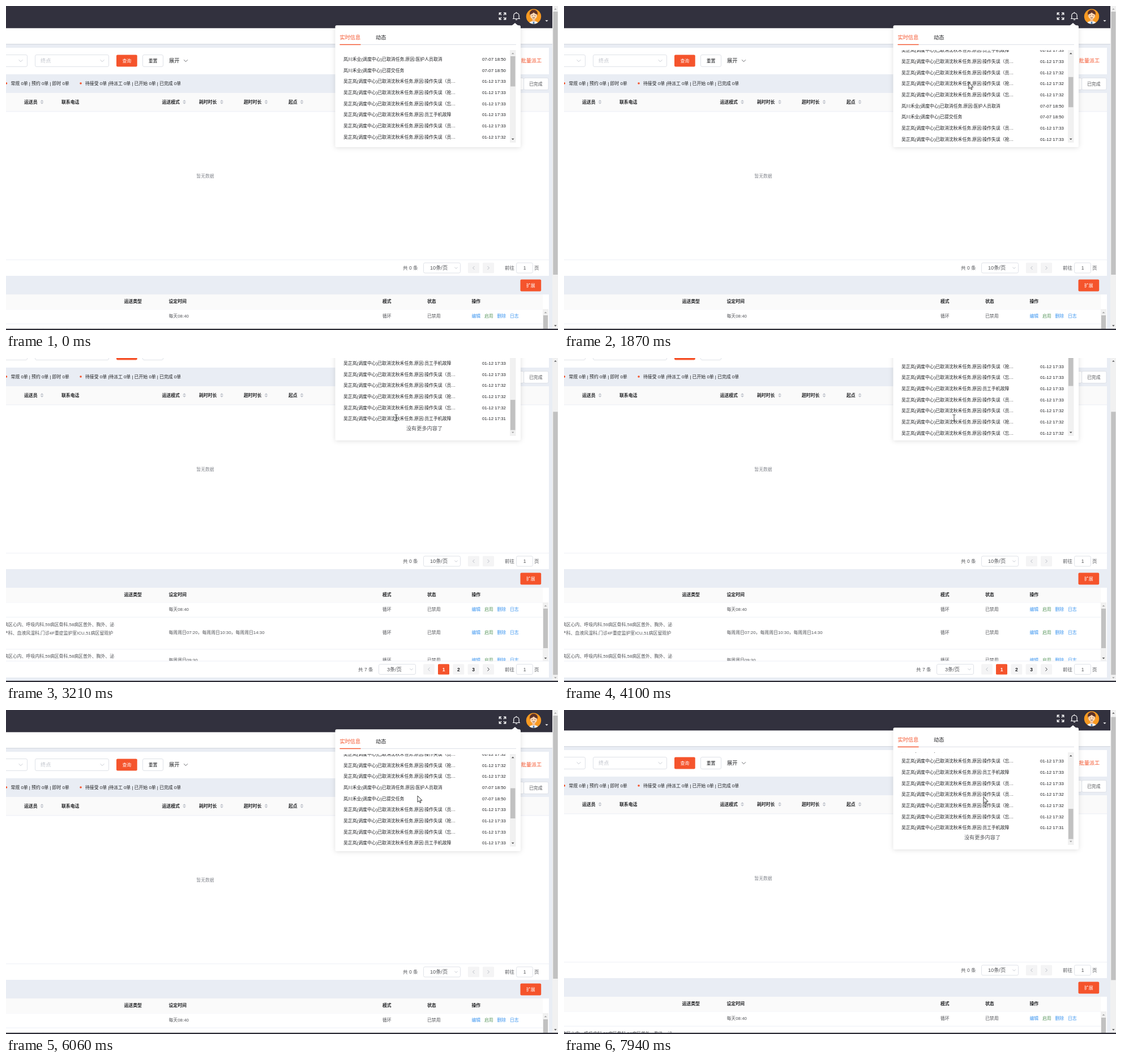
These frames come from a looping animation (975x574 px, 8000 ms). An HTML page:

```html
<!DOCTYPE html>
<html>
<head>
<meta charset="utf-8">
<title>Notification panel</title>
<style>
  html, body { margin: 0; width: 100%; height: 100%; overflow: hidden; background: #e9edf4; }
  svg { display: block; width: 975px; height: 574px; }
  text { font-family: "Liberation Sans", "Noto Sans CJK SC", "Noto Sans CJK", sans-serif; white-space: pre; }
</style>
</head>
<body>
<svg id="stage" viewBox="0 0 975 574"></svg>
<script>
const LOOP = 8000, ROW = 19.67;
const S = 7.87, M = 8.53, L = 9.19;
const ACCENT = '#f5542c', DARK = '#1f2023', GREY = '#525458', PALE = '#c0c4cc', LINE = '#ebeef5', BLUE = '#3b95f0';

// Markup helpers; y is the vertical centre of a text
const rect = (x, y, w, h, fill, extra = '') =>
  `<rect x="${x}" y="${y}" width="${w}" height="${h}" fill="${fill}" ${extra}/>`;
const path = (d, extra) => `<path d="${d}" ${extra}/>`;
const text = (x, y, str, { size = S, fill = GREY, anchor = 'start', weight = 400 } = {}) =>
  `<text x="${x}" y="${y + size * .37}" font-size="${size}" fill="${fill}" text-anchor="${anchor}" font-weight="${weight}">${str}</text>`;
const head = (x, y, str) => text(x, y, str, { fill: DARK, weight: 700 });
const box = (x, y, w, h) => rect(x + .5, y + .5, w - 1, h - 1, '#fff', 'rx="2.5" stroke="#dcdfe6" stroke-width=".9"');
const button = (x, y, str) => rect(x, y, 36.7, 21, ACCENT, 'rx="2"') +
  text(x + 18.3, y + 10.7, str, { fill: '#fff', anchor: 'middle', weight: 500 });
const chevron = (x, y, color = PALE, turn = 0, r = 3.4) =>
  path(`M${-r} ${-r / 2}L0 ${r / 2} ${r} ${-r / 2}`, `transform="translate(${x} ${y}) rotate(${turn})" fill="none" stroke="${color}" stroke-width=".9"`);
const triangle = (x, y, dir, r, fill, id = '') =>
  path(`M${x - r} ${y + dir * r / 2}h${2 * r}L${x} ${y - dir * r / 2}Z`, `fill="${fill}" ${id && `id="${id}"`}`);
const carets = (x, y) => triangle(x, y - 2.3, 1, 3, PALE) + triangle(x, y + 2.3, -1, 3, PALE);
const pageButton = (x, y, label, active) => rect(x, y - 9.3, 20, 18.6, active ? ACCENT : '#f4f4f5', 'rx="1.5"') +
  text(x + 10, y, label, { size: M, fill: active ? '#fff' : DARK, anchor: 'middle', weight: 700 });
const arrowButton = (x, y, turn, color) => pageButton(x, y, '') + chevron(x + 10, y, color, turn, 3);

function pager(y, total, totalX, selectX, perPage, labelX) {
  return text(totalX, y, `共 ${total} 条`, { size: M }) +
    box(selectX, y - 9.5, 66, 19) + text(labelX, y, perPage, { size: L }) + chevron(selectX + 58, y, PALE, 0, 2.6) +
    text(881, y, '前往', { size: M }) + box(901, y - 9.5, 30, 19) +
    text(916, y, '1', { size: M, anchor: 'middle' }) + text(933, y, '页', { size: M });
}

function topBar() {
  let s = rect(0, 39, 965, 28.5, '#fff') + rect(0, 0, 965, 39.3, '#32313e') + rect(0, 67, 965, 1.3, '#d6dae1');
  for (const turn of [0, 90, 180, 270])
    s += path('M2 -2L5.5 -5.5M2 -5.7H5.7V-2', `transform="translate(877 18) rotate(${turn})" fill="none" stroke="#fff" stroke-width="1.4"`);
  s += path('M895 22.5H908M896.7 22V17a4.7 4.7 0 0 1 9.4 0V22M901.4 12V10.7M900 24.3H903', 'fill="none" stroke="#fff" stroke-width="1.2"');
  s += '<clipPath id="face"><circle cx="932" cy="18.5" r="13.2"/></clipPath><g clip-path="url(#face)">' +
    rect(918, 5, 28, 28, '#f89a22') +
    '<ellipse cx="932" cy="32.5" rx="9" ry="6" fill="#eef3f8"/>' +
    rect(929.5, 21, 5, 6.5, '#eebb94') +
    '<ellipse cx="932" cy="13.2" rx="7" ry="6.8" fill="#5f3328"/>' +
    '<ellipse cx="932" cy="17.2" rx="5.9" ry="6.2" fill="#fbd7b5"/>' +
    path('M926 14.5Q927 9 932 9T938 14.5Q934 14 932 11.5 930 14 926 14.5Z', 'fill="#5f3328"') +
    path('M928.8 17h1.6M933.6 17h1.6M930 20.5q2 1.5 4 0', 'stroke="#5a3527" stroke-width=".9" fill="none"') +
    path('M931 28h2l.8 4h-3.6Z', 'fill="#4b7fb5"') + '</g>';
  return s + triangle(955, 26.5, -1, 2.6, '#fff');
}

function filters() {
  let s = rect(0, 74, 959, 47, '#fff') + box(-60, 86, 98, 22) + chevron(26, 97) +
    box(51, 86, 131, 22) + text(61, 97, '终点', { size: L, fill: PALE }) + chevron(170, 97) +
    button(195, 86.5, '查询') + box(241, 86, 37, 22) +
    text(259.5, 97, '重置', { fill: DARK, anchor: 'middle', weight: 500 }) +
    text(288, 97, '展开', { size: L, fill: DARK }) + chevron(317.5, 97, GREY) +
    text(909.5, 97, '批量派工', { size: L, fill: ACCENT });
  for (const x of [.5, 132]) s += `<circle cx="${x}" cy="137" r="1.8" fill="${ACCENT}"/>`;
  return s + text(8.5, 137, '常规 0单 | 预约 0单 | 即时 0单', { fill: DARK }) +
    text(140, 137, '待接受 0单 |待派工 0单 | 已开始 0单 | 已完成 0单', { fill: DARK }) +
    box(870, 127, 45, 22) + box(914, 127, 44.5, 22) + text(924, 138, '已完成');
}

function taskTable() {
  let s = rect(0, 154, 959, 324, '#fff') + rect(0, 154, 959, 33, '#fafafa') +
    rect(0, 186.5, 959, .9, LINE) + rect(0, 449.3, 959, .9, LINE) + head(98, 170, '联系电话');
  for (const [x, caretX, label] of [[32, 63.5, '运送员'], [275.5, 315, '运送模式'], [341, 381, '耗时时长'], [420, 459.5, '超时时长'], [499, 522.5, '起点']])
    s += head(x, 170, label) + carets(caretX, 170);
  return s + text(352, 301, '暂无数据', { fill: '#85888f', anchor: 'middle' }) +
    pager(464, 0, 701, 737, '10条/页', 749) + arrowButton(816, 464, 90, '#b4b8bf') + arrowButton(842, 464, -90, '#b4b8bf');
}

function planRow(y, schedule) {
  const link = (x, str, fill = BLUE) => text(x, y, str, { fill });
  return text(287.5, y, schedule) + text(665, y, '循环') + text(744, y, '已禁用') +
    link(822.5, '编辑') + link(845, '启用', '#5f9a63') + link(867.5, '删除') + link(890, '日志');
}

function planTable() {
  const wards = y => text(191, y, '57病区心内、呼吸内科,59病区骨科,58病区普外、胸外、泌', { anchor: 'end' });
  let s = button(908.5, 484.5, '扩展') + rect(0, 511, 959, 159, '#fff') + rect(0, 511, 948, 26, '#fafafa');
  for (const [x, label] of [[208.5, '运送类型'], [287.5, '设定时间'], [665, '模式'], [744, '状态'], [822.5, '操作']])
    s += head(x, 523, label);
  s += '<clipPath id="plans"><rect y="537" width="959" height="104"/></clipPath><g clip-path="url(#plans)">' +
    [536.5, 562.7, 619.5].map(y => rect(0, y, 948, .9, LINE)).join('') +
    planRow(549.5, '每天08:40') + planRow(590.5, '每周周日07:20，每周周日10:30，每周周日14:30') + planRow(639.5, '每周周日09:30') +
    wards(575.6) + text(189, 590.8, '妇产科、血液风湿科,门诊4F重症监护室ICU,51病区留观护', { anchor: 'end' }) + wards(632.4) +
    rect(948, 537, 10, 104, '#f1f1f1') + rect(949, 548, 8, 70, '#c1c1c1') +
    triangle(953, 543, 1, 2.4, '#a3a3a3') + triangle(953, 636, -1, 2.4, '#505050') + '</g>' + rect(0, 640.5, 959, .9, LINE);
  s += pager(655.5, 7, 622, 658, '3条/页', 673) + arrowButton(737, 655.5, 90, '#b4b8bf') + arrowButton(842, 655.5, -90, DARK);
  [1, 2, 3].forEach((n, i) => s += pageButton(763 + 26.3 * i, 655.5, n, n === 1));
  return s;
}

function messages() {
  const cancelled = reason => `吴芷岚(调度中心)已取消沈秋禾任务,原因:${reason}`;
  const slip = c => cancelled(`操作失误（${c}…`);
  const phone = cancelled('员工手机故障');
  const batch = [
    ['岚川禾业(调度中心)已取消任务,原因:医护人员取消', '07-07 18:50'], ['岚川禾业(调度中心)已提交任务', '07-07 18:50'],
    ...[slip('员'), slip('抢'), slip('忘'), phone, slip('员')].map(m => [m, '01-12 17:33']),
    ...['员', '抢', '忘'].map(c => [slip(c), '01-12 17:32'])];
  return [...batch, ...batch, [phone, '01-12 17:31']].map(([message, time], i) =>
    text(596, 94 + i * ROW, message, { fill: DARK }) + text(841, 94 + i * ROW, time, { fill: DARK })).join('') +
    text(739, 504.3, '没有更多内容了', { size: L, anchor: 'middle' });
}

function popover() {
  return path('M893 35L899 30 905 35Z', 'fill="#fff"') +
    rect(581.5, 34.3, 327.5, 215.7, '#fff', 'rx="2.5" style="filter:drop-shadow(0 1px 4px rgba(0,0,0,.13))"') +
    text(589.5, 56, '实时信息', { size: L, fill: ACCENT }) + text(653, 56, '动态', { size: L, fill: DARK }) +
    rect(589.5, 67.8, 311.5, 1.2, '#e1e4ea') + rect(589.5, 67.7, 37, 1.4, ACCENT) +
    '<clipPath id="view"><rect x="589" y="78" width="312" height="164"/></clipPath>' +
    `<g clip-path="url(#view)"><g id="list">${messages()}</g></g>` +
    rect(890, 78, 10.5, 164, '#f1f1f1') + rect(891, 89, 8.5, 53.5, '#c1c1c1', 'id="listThumb"') +
    triangle(895.2, 84, 1, 2.4, '#505050', 'listUp') + triangle(895.2, 236, -1, 2.4, '#505050', 'listDown');
}

const $ = id => document.getElementById(id);
$('stage').innerHTML = rect(0, 0, 975, 574, '#e9edf4') +
  `<g id="page">${topBar() + filters() + taskTable() + planTable() + popover()}</g>` +
  rect(965, 0, 10, 574, '#f1f1f1') + rect(966.3, 10, 8.2, 466, '#c1c1c1', 'id="pageThumb"') +
  triangle(970.4, 5.3, 1, 2.3, '#505050', 'pageUp') + triangle(970.4, 566.5, -1, 2.3, '#505050', 'pageDown') +
  rect(0, 571.8, 975, 2.2, '#2b2b35') +
  path('M0 0V11.2L2.6 8.8 4.3 12.6 6 11.8 4.4 8.2H8Z', 'id="arrow" fill="#fff" stroke="#222" stroke-width=".9"') +
  path('M-2.4 -5.5H-.7L0 -5 .7 -5.5H2.4M0 -5V5M-2.4 5.5H-.7L0 5 .7 5.5H2.4', 'id="beam" fill="none" stroke="#333" stroke-width=".9"');

// Wheel notches: start, duration, target
const listMoves = [[1275, 325, 100], [1805, 325, 200], [2135, 325, 276], [3405, 268, 167], [3673, 268, 58], [3941, 268, 0],
  [5515, 325, 109], [5930, 325, 218], [6335, 325, 276]];
const pageMoves = [[2460, 5, .66], [2475, 265, 104], [4960, 325, 0], [7935, 5, 3]];
// Pointer moves: start, end, x, y, shape at rest
const pointerMoves = [[120, 890, 715, 135.5, 'beam'], [1870, 2000, 705, 147, 'arrow'], [3080, 3210, 689, 106, 'beam'],
  [4740, 4950, 729, 142, 'beam'], [5580, 5640, 727, 152, 'arrow'], [7590, 7870, 741, 154, 'arrow']];

const clamp = x => Math.min(1, Math.max(0, x));
const ease = x => { x **= .9; return x * x * (3 - 2 * x); };

// Each notch is shown in five held steps
function scrollAt(moves, t) {
  let pos = 0;
  for (const [start, duration, target] of moves)
    pos += (target - pos) * ease(Math.floor(clamp((t - start) / duration) * 5 + 1e-6) / 5);
  return pos;
}

function pointerAt(t) {
  let x = 920, y = 580, shape = 'arrow';
  for (const [start, end, toX, toY, rest] of pointerMoves) {
    if (t < start) break;
    const p = clamp((t - start) / (end - start));
    x += (toX - x) * p;
    y += (toY - y) * p;
    shape = p < 1 ? 'arrow' : rest;
  }
  return { x, y, shape };
}

const move = (id, x, y) => $(id).setAttribute('transform', `translate(${x} ${y})`);
const enable = (id, on) => $(id).setAttribute('fill', on ? '#505050' : '#a3a3a3');

function draw(now) {
  const t = now % LOOP, list = scrollAt(listMoves, t), page = scrollAt(pageMoves, t), pointer = pointerAt(t);
  move('page', 0, -page);
  move('pageThumb', 0, page * .82);
  move('list', 0, -list);
  move('listThumb', 0, list * .323);
  enable('listUp', list > 0);
  enable('listDown', list < 276);
  enable('pageUp', page > 0);
  enable('pageDown', page < 104);
  for (const shape of ['arrow', 'beam']) {
    $(shape).style.display = shape === pointer.shape ? '' : 'none';
    move(shape, pointer.x, pointer.y);
  }
  requestAnimationFrame(draw);
}
requestAnimationFrame(draw);
</script>
</body>
</html>
```
